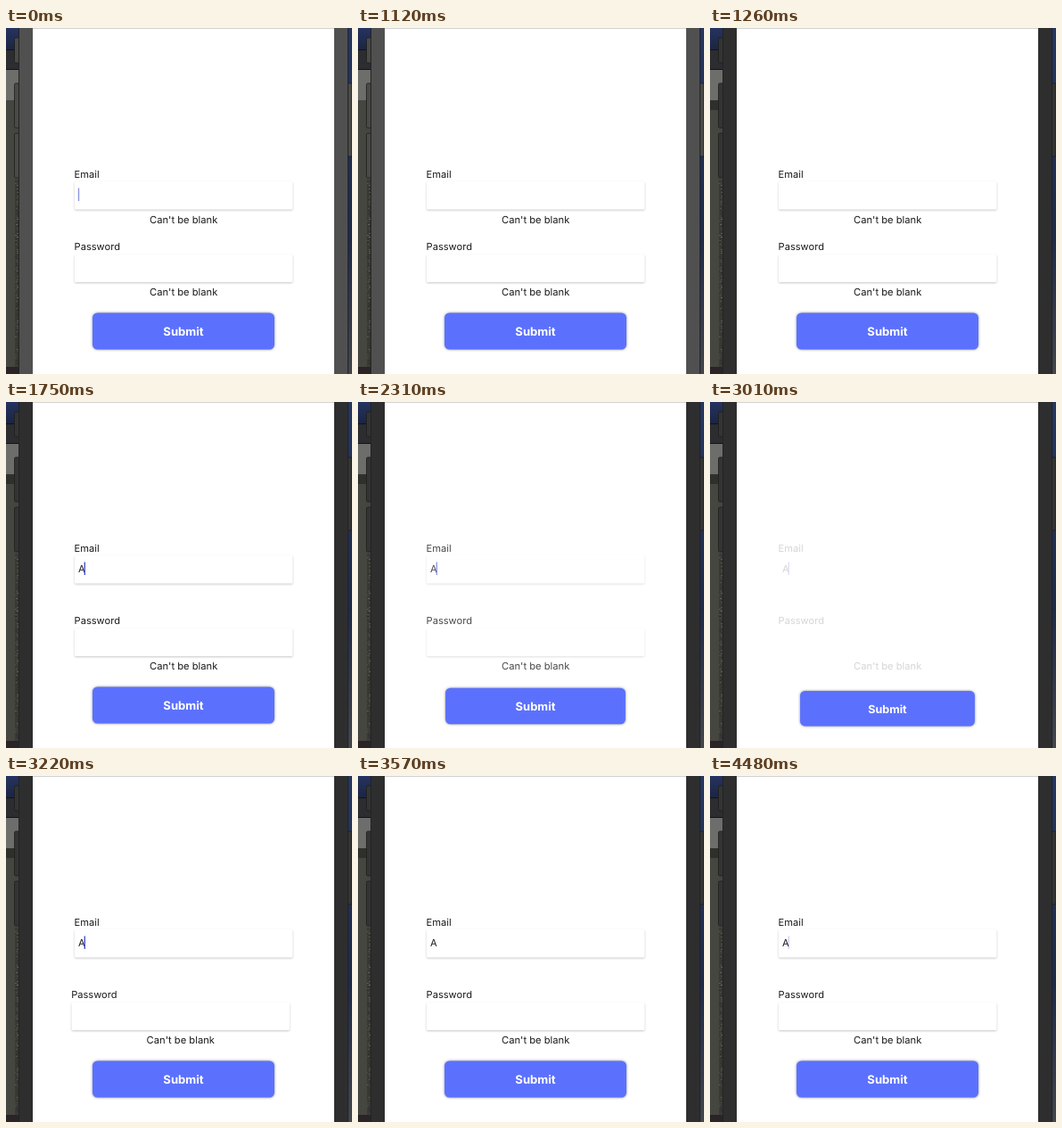
An HTML page that plays this animation: 388x388 px, repeating every 4.55 s.

```html
<!DOCTYPE html>
<html lang="en">
<head>
<meta charset="utf-8">
<title>Sign-in form</title>
<style>
html, body { margin: 0; width: 100%; height: 100%; overflow: hidden; background: #35363a; }
svg { display: block; width: 388px; height: 388px; }
text { font: 11.1px Inter, "Open Sans", sans-serif; fill: #1a1a1a; text-rendering: geometricPrecision; }
.error { font-size: 11.2px; text-anchor: middle; }
.field { fill: #fff; filter: drop-shadow(0 1.5px 1.3px rgba(0, 0, 0, .22)); }
.button { fill: #5b71fe; filter: drop-shadow(0 .8px 1.8px rgba(0, 0, 0, .45)); }
#submitText { font-size: 13.1px; font-weight: 700; fill: #fff; text-anchor: middle; }
</style>
</head>
<body>
<svg viewBox="0 0 388 388">
  <defs>
    <linearGradient id="sky" x1="0" y1="0" x2="0" y2="1">
      <stop offset="0" stop-color="#25335f"/><stop offset="1" stop-color="#1b2542"/>
    </linearGradient>
    <linearGradient id="dusk" x1="0" y1="0" x2="0" y2="1">
      <stop offset="0" stop-color="#263663"/><stop offset=".6" stop-color="#1f2a4b"/>
      <stop offset="1" stop-color="#44464c"/>
    </linearGradient>
  </defs>

  <rect width="16" height="25" fill="url(#sky)"/>
  <rect y="24" width="16" height="23" fill="#2c2d31"/>
  <rect y="24" width="16" height="1" fill="#111317"/>
  <rect y="46" width="16" height="35" fill="#6d6d6b"/>
  <rect y="46" width="16" height="1" fill="#111317"/>
  <rect y="81" width="16" height="307" fill="#464640"/>
  <rect id="band" y="81" width="10" height="11" fill="#2f2f2c"/>
  <rect x="10" y="170" width="5" height="210" fill="#3a3a35"/>
  <g id="specks"></g>
  <rect y="380" width="16" height="8" fill="#2b2426"/>
  <rect x="382" width="6" height="388" fill="url(#dusk)"/>
  <g id="keys" stroke="#1d1d1d" stroke-width=".8">
    <rect x="9.5" y="11" width="7" height="28" rx="1.5"/>
    <rect x="9.5" y="62" width="7" height="50" rx="1.5"/>
    <rect x="9.5" y="118" width="7" height="50" rx="1.5"/>
    <rect x="381" y="62" width="7" height="82" rx="1.5"/>
  </g>
  <rect id="bezel" x="15" width="368" height="388"/>
  <path d="M14.5 0V388M383.5 0V388" stroke="#222325"/>
  <rect x="30" width="338" height="388" fill="#fff"/>
  <rect x="30" width="338" height="1" fill="#d2d2d2"/>

  <g id="form">
    <text x="76.6" y="168">Email</text>
    <rect class="field" x="77" y="172" width="244.5" height="31.5" rx="1.5"/>
    <text id="typed" x="81" y="191">A</text>
    <rect id="caret" y="179.5" width="1.4" height="14.5" fill="#4553c4"/>
    <text id="emailError" class="error" x="199.2" y="218.5">Can't be blank</text>
    <g id="password">
      <text x="76.6" y="249">Password</text>
      <rect class="field" x="77" y="254" width="244.5" height="31" rx="1.5"/>
      <text id="passError" class="error" x="199.2" y="299.7">Can't be blank</text>
    </g>
  </g>
  <g id="loader" stroke="#6e78d8" stroke-width="1.5" stroke-linecap="round"></g>
  <g id="submit">
    <rect class="button" x="-102" y="-20.5" width="204" height="41" rx="5.5"/>
    <text id="submitText" x="0" y="5">Submit</text>
    <g id="busy" stroke="#fff" stroke-width="1.1" stroke-linecap="round"></g>
  </g>
</svg>
<script>
const LOOP = 4550, STEP = 70, TICKS = 12;
const $ = id => document.getElementById(id);
const show = (id, v) => $(id).setAttribute("opacity", +v);

// Smooth 0 to 1 between times a and b.
function ramp(t, a, b) {
  const u = Math.min(1, Math.max(0, (t - a) / (b - a)));
  return u * u * (3 - 2 * u);
}
const pulse = (t, on, rise, off, fall) => ramp(t, on, on + rise) * (1 - ramp(t, off, off + fall));

// Start and end of each lit phase of the caret.
const blinks = [[-560, -90], [420, 910], [1470, 2240], [2800, 3360], [3780, 4340]];
const caretAt = t => Math.max(...blinks.map(([on, off]) => pulse(t, on, 140, off, 210)));

const shakeAt = t => t > 3195 && t < 3570 ? -6.4 * Math.sin(Math.PI * (t - 3195) / 140) : 0;

function add(parent, tag, attrs) {
  const el = document.createElementNS("http://www.w3.org/2000/svg", tag);
  for (const k in attrs) el.setAttribute(k, attrs[k]);
  parent.append(el);
  return el;
}

function makeSpinner(id, cx, cy, inner, outer) {
  return Array.from({ length: TICKS }, (_, i) => add($(id), "line", {
    x1: inner, x2: outer,
    transform: `translate(${cx} ${cy}) rotate(${i * 360 / TICKS})`
  }));
}

function spin(ticks, lead, floor) {
  ticks.forEach((tick, i) => {
    const lag = ((lead - i) % TICKS + TICKS) % TICKS;
    tick.setAttribute("opacity", Math.max(floor, 1 - lag / 7));
  });
}

let seed = 7;
const random = () => (seed = seed * 16807 % 2147483647) / 2147483647;
for (let y = 174; y < 378; y += 2) {
  add($("specks"), "rect", {
    x: 10 + random() * 3, y, width: .6 + random() * 1.6, height: 1,
    fill: random() < .5 ? "#77776f" : "#24241f", opacity: .3 + random() * .6
  });
}

const loaderTicks = makeSpinner("loader", 199, 237.5, 8, 14.3);
const busyTicks = makeSpinner("busy", 0, 0, 4.2, 7.4);

function draw(t) {
  const dark = t >= 1260, typed = t >= 1680;
  const loading = t >= 2380 && t < 2940;
  const wait = pulse(t, 2240, 210, 3010, 210);
  const lead = 7 + Math.floor((t - 2450) / 83);

  $("bezel").setAttribute("fill", dark ? "#2e2e2e" : "#505050");
  $("keys").setAttribute("fill", dark ? "#343432" : "#4a4a47");
  show("band", dark);

  show("form", 1 - .82 * wait);
  for (const field of document.querySelectorAll(".field")) field.setAttribute("opacity", 1 - wait);
  show("typed", typed);
  show("caret", caretAt(t));
  $("caret").setAttribute("x", typed ? 87.6 : 80.8);
  show("emailError", !typed);
  show("passError", !loading);
  $("password").setAttribute("transform", `translate(${shakeAt(t)} 0)`);

  $("submit").setAttribute("transform", `translate(199 ${340 + 3.7 * wait}) scale(${1 - .04 * wait})`);
  show("submitText", !loading);
  show("busy", loading);
  show("loader", .7 * pulse(t, 2310, 350, 2800, 210));
  spin(loaderTicks, lead, 0);
  spin(busyTicks, lead, .35);
}

const start = performance.now();
function frame() {
  const t = (performance.now() - start) % LOOP;
  draw(Math.floor(t / STEP) * STEP);
  requestAnimationFrame(frame);
}
draw(0);
requestAnimationFrame(frame);
</script>
</body>
</html>
```
